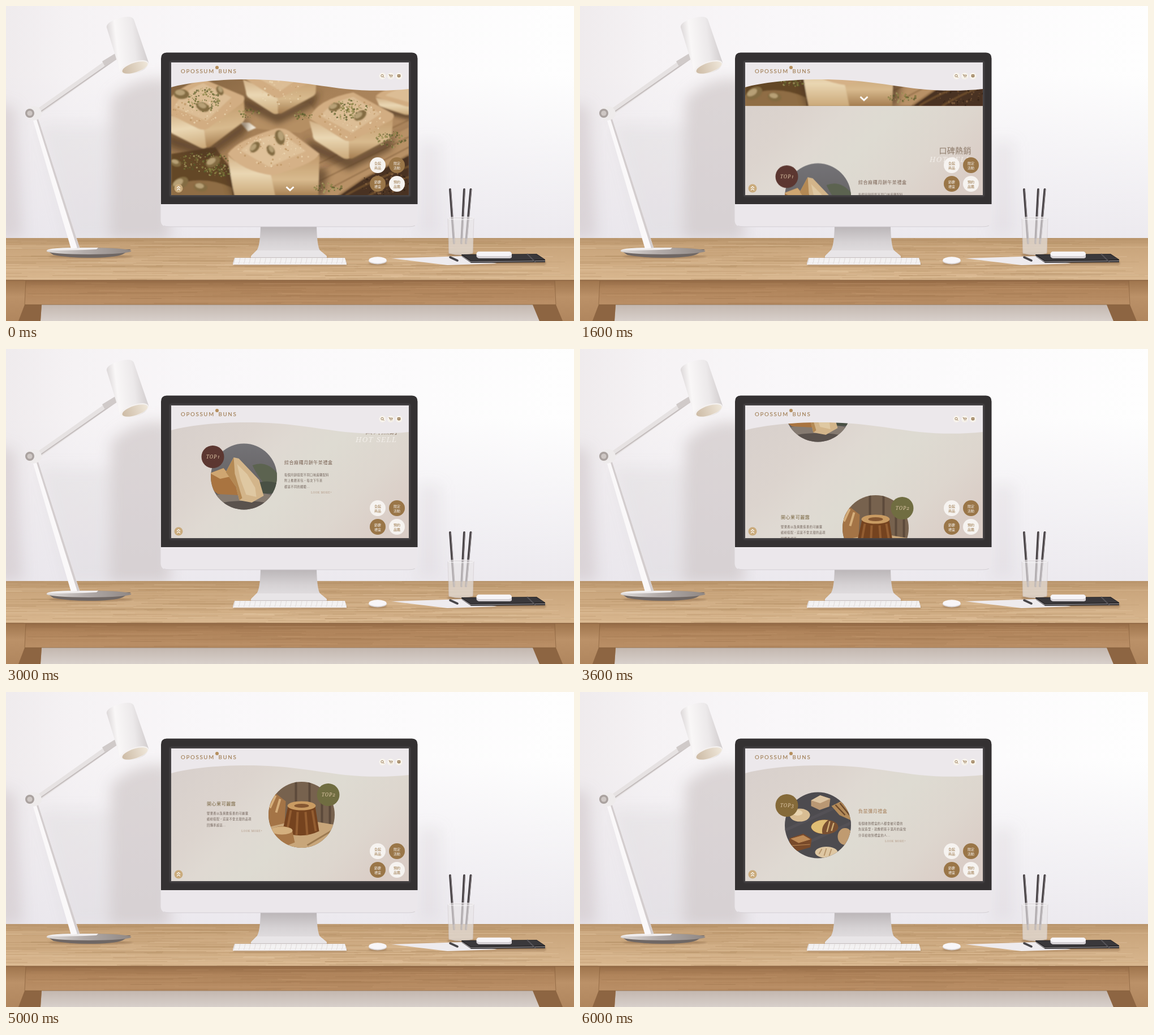
An HTML page for the animation above (7000 ms loop, 1004x558 px).

```html
<!DOCTYPE html>
<html>
<head>
<meta charset="utf-8">
<title>Cake shop on a desk</title>
<style>
html, body { margin: 0; width: 100%; height: 100%; overflow: hidden; background: #f7f5f8; }
svg { position: absolute; display: block; }
#room { left: 0; top: 0; }
#screen { left: 292px; top: 100px; overflow: hidden; }
text { font-family: "Noto Sans CJK TC", "Noto Sans CJK", sans-serif; }
.logo { font: 9.7px Lato, sans-serif; letter-spacing: 1.7px; fill: #a3825a; stroke: #a3825a; stroke-width: .2; }
.heading { font-size: 14px; letter-spacing: .3px; fill: #8b7867; }
.title { font-size: 8px; font-weight: 500; letter-spacing: .55px; }
.body { font-size: 5.2px; letter-spacing: .45px; fill: #6f6058; }
.btn { font-size: 6px; text-anchor: middle; }
.serif { font-family: "Noto Serif", serif; font-variant-numeric: oldstyle-nums; }
.sell { font-size: 13px; font-style: italic; letter-spacing: 1.4px; fill: #f6f2ee; opacity: .85; }
.top { font-size: 8.6px; font-style: italic; letter-spacing: .9px; text-anchor: middle; fill: #dcc4a4; }
.more { font-size: 5px; letter-spacing: .42px; fill: #b39a86; }
</style>
</head>
<body>
<svg id="room" width="1004" height="558" viewBox="0 0 1004 558">
  <defs>
    <linearGradient id="wall">
      <stop offset="0" stop-color="#efebed"/><stop offset=".12" stop-color="#f5f2f4"/>
      <stop offset=".35" stop-color="#f9f7f9"/><stop offset="1" stop-color="#fefefe"/>
    </linearGradient>
    <linearGradient id="wallLow" x2="0" y2="1">
      <stop offset=".3" stop-color="#e9e6ec" stop-opacity="0"/><stop offset="1" stop-color="#e9e6ec" stop-opacity=".85"/>
    </linearGradient>
    <linearGradient id="desk" x2="0" y2="1">
      <stop offset="0" stop-color="#b8946b"/><stop offset=".2" stop-color="#c9a57c"/><stop offset="1" stop-color="#d9b78f"/>
    </linearGradient>
    <linearGradient id="apron" x2="0" y2="1">
      <stop offset="0" stop-color="#946a45"/><stop offset=".35" stop-color="#b0845b"/><stop offset="1" stop-color="#ba8f66"/>
    </linearGradient>
    <linearGradient id="leg" x2="0" y2="1">
      <stop offset="0" stop-color="#9f754d"/><stop offset=".4" stop-color="#bb9168"/><stop offset="1" stop-color="#b0865e"/>
    </linearGradient>
    <linearGradient id="floor" x2="0" y2="1"><stop offset="0" stop-color="#c3b7af"/><stop offset="1" stop-color="#d8d0cb"/></linearGradient>
    <linearGradient id="neck" x2="0" y2="1">
      <stop offset="0" stop-color="#bab5b7"/><stop offset=".5" stop-color="#d6d2d4"/><stop offset="1" stop-color="#e6e3e5"/>
    </linearGradient>
    <linearGradient id="head" x1="0" y1=".55" x2="1" y2=".4">
      <stop offset="0" stop-color="#d5d0d1"/><stop offset=".25" stop-color="#f9f7f7"/>
      <stop offset=".65" stop-color="#ece9ea"/><stop offset="1" stop-color="#cdc8c9"/>
    </linearGradient>
    <linearGradient id="bulb"><stop offset="0" stop-color="#cdbba5"/><stop offset="1" stop-color="#efe7da"/></linearGradient>
    <linearGradient id="foot"><stop offset="0" stop-color="#dedad8"/><stop offset=".45" stop-color="#b3acaa"/><stop offset="1" stop-color="#8f8783"/></linearGradient>
    <filter id="soft" x="-50%" y="-50%" width="200%" height="200%"><feGaussianBlur stdDeviation="12"/></filter>
    <filter id="edge" x="-20%" y="-50%" width="140%" height="200%"><feGaussianBlur stdDeviation="1.6"/></filter>
  </defs>
  <rect width="1004" height="412" fill="url(#wall)"/>
  <rect width="1004" height="412" fill="url(#wallLow)"/>
  <g filter="url(#soft)" fill="#c9bfc0">
    <path d="M186 165Q230 120 290 130V415H184Z" opacity=".58"/>
    <path d="M60 210H190V415H110Z" opacity=".18"/>
    <path d="M-30 170L16 180L30 412H-30Z" opacity=".48"/>
    <path d="M728 240H768V405H728Z" opacity=".2"/>
  </g>

  <rect y="411" width="1004" height="76" fill="url(#desk)"/>
  <rect y="529" width="1004" height="29" fill="url(#floor)"/>
  <rect y="486" width="1004" height="43" fill="url(#apron)"/>
  <path d="M0 486H35L33 529H63L61 558H0ZM1004 486H970L972 529H931L943 558H1004Z" fill="url(#leg)"/>
  <path d="M33 529H63L61 558H22ZM972 529H931L943 558H984Z" fill="#8d6542"/>
  <g id="grain" stroke-width=".8"></g>
  <path d="M35 486L33 529H972L970 486" fill="none" stroke="#805a38" opacity=".6"/>
  <path d="M0 486H1004" stroke="#8b6340" stroke-width="1.4"/>

  <g filter="url(#edge)" fill="#805f40" opacity=".45">
    <ellipse cx="150" cy="444" rx="74" ry="3"/><ellipse cx="501" cy="446" rx="70" ry="3"/>
    <rect x="402" y="455" width="200" height="5"/><ellipse cx="657" cy="456" rx="16" ry="3"/>
    <ellipse cx="806" cy="441" rx="26" ry="4"/><path d="M815 452H954V458H790Z"/>
  </g>

  <path d="M72 433L84 441Q110 446 146 446Q190 446 206 440L221 431Z" fill="#6f6764"/>
  <ellipse cx="146.500" cy="434" rx="75" ry="6" fill="url(#foot)"/>
  <path d="M72 433Q74 429 110 428H163L160 431Q120 433 72 433Z" fill="#efecec"/>
  <path d="M48 203L57 200L130 428L115 430Z" fill="#faf8f9"/>
  <path d="M57 200L130 428L126 429L54 201Z" fill="#d3cdce"/>
  <path d="M57 181L192 85L198 93L62 190Z" fill="#e6e2e2"/>
  <path d="M60 188L197 92" stroke="#c3bcbc" stroke-width="2"/>
  <path d="M170 98L193 84L198 93L175 107Z" fill="#d0cac9"/>
  <ellipse cx="49" cy="190" rx="14" ry="12.5" fill="#eeebeb"/>
  <circle cx="42" cy="190" r="8" fill="#aaa29f"/><circle cx="42" cy="190" r="4.600" fill="#cec7c4"/>
  <path d="M178 38Q176 30 198 22Q222 15 226 24L252 100Q250 114 226 120Q206 124 202 117Z" fill="url(#head)"/>
  <ellipse cx="227" cy="108.500" rx="26" ry="10" fill="#f4f1f0" transform="rotate(-18 227 108.500)"/>
  <ellipse cx="228" cy="109" rx="23.500" ry="8.400" fill="url(#bulb)" transform="rotate(-18 228 109)"/>

  <path d="M450 390H549Q550 426 555 433L567 443V446H433V443L443 433Q449 426 450 390Z" fill="url(#neck)"/>
  <path d="M443 433L433 443V446H567V443L555 433Z" fill="#e8e5e7"/>
  <path d="M433 445.500H567" stroke="#c9c2c3"/>
  <path d="M273.500 350H727.500V379Q727.500 391 716 391H285Q273.500 391 273.500 379Z" fill="#ebe7eb"/>
  <path d="M279 389.500Q283 391 290 391H712Q719 391 723 389" fill="none" stroke="#d3ced3"/>
  <path d="M274 351V93Q274 82.500 284 82.500H717.500Q727.500 82.500 727.500 93V351Z" fill="#343132"/>
  <rect x="291" y="99" width="422" height="237" fill="none" stroke="#565256" stroke-width="2" filter="url(#edge)"/>

  <path d="M404 446H599L602 455V458H401V455Z" fill="#e0dbda"/>
  <g stroke="#faf9fa" stroke-width="1.9" stroke-dasharray="8 1.1">
    <path d="M405 447.600H599M404.500 450.200H600M404 452.800H600M403 455.400H601"/>
  </g>
  <path d="M401 457.500H602" stroke="#f6f4f5" stroke-width="1.400"/>
  <ellipse cx="657" cy="451.500" rx="16" ry="6" fill="#d9d4d5"/>
  <ellipse cx="657" cy="450" rx="15.600" ry="5.800" fill="#f8f6f8"/>

  <path d="M681 447L806 443L868 456L780 459Z" fill="#eeebee"/>
  <g fill="none" stroke="#484346" stroke-linecap="round">
    <path stroke-width="4" d="M785 325L792 420M810 325L805 420M821.500 325L813 420"/>
    <path stroke-width="1" stroke="#8b8487" d="M786.300 325L793 420M811.300 325L806.300 420M822.700 325L814.300 420"/>
  </g>
  <path d="M781 376Q804 372 827 376L825 438Q804 444 783 438Z" fill="#e9e5e7" opacity=".66" stroke="#cfc8ca"/>
  <path d="M783 412H826L825 438Q804 444 783 438Z" fill="#d9cdc0" opacity=".4"/>
  <ellipse cx="804" cy="376" rx="23" ry="2.500" fill="none" stroke="#f8f6f8"/>
  <path d="M785 445L798 451" stroke="#48464a" stroke-width="3.600" stroke-linecap="round"/>
  <path d="M805 440L938 439L953 449V454L822 455L806 444Z" fill="#2a282a"/>
  <path d="M807 441L937 440L952 449L822 451Z" fill="#3a383b"/>
  <path d="M806 443L821 453L953 451.500" fill="none" stroke="#a9a5a8" stroke-width="1.100"/>
  <path d="M921 439L936 454" stroke="#565458" stroke-width="2"/>
  <path d="M835 435H890Q894 436 894 440V445Q893 447 889 447H836Q832 446 831.500 443V439Q832 436 835 435Z" fill="#d5d1d5"/>
  <path d="M835 435H890Q894 436 894 440Q892 443 889 443H836Q832 442 831.500 439Q832 436 835 435Z" fill="#f6f4f7"/>
</svg>

<svg id="screen" width="420" height="235" viewBox="292 100 420 235">
  <defs>
    <linearGradient id="paper" x1="0" y1=".2" x2="1" y2=".75">
      <stop offset="0" stop-color="#d8d0cc"/><stop offset=".26" stop-color="#dcd4ce"/>
      <stop offset=".4" stop-color="#dfd9d2"/><stop offset=".56" stop-color="#dedbd2"/>
      <stop offset=".8" stop-color="#ddd6ce"/><stop offset="1" stop-color="#dacdc6"/>
    </linearGradient>
    <linearGradient id="board" x2="1" y2="1">
      <stop offset="0" stop-color="#7c5d3b"/><stop offset=".45" stop-color="#a78158"/>
      <stop offset=".7" stop-color="#b08960"/><stop offset="1" stop-color="#6b4c33"/>
    </linearGradient>
    <linearGradient id="side" x2="0" y2="1"><stop offset="0" stop-color="#d2b187"/><stop offset=".45" stop-color="#ead7b3"/><stop offset="1" stop-color="#cba97a"/></linearGradient>
    <linearGradient id="shade" x2="0" y2="1"><stop offset="0" stop-color="#c19a6c"/><stop offset=".6" stop-color="#d8ba8e"/><stop offset="1" stop-color="#a57e51"/></linearGradient>
    <linearGradient id="slate" x2="0" y2="1"><stop offset="0" stop-color="#747377"/><stop offset="1" stop-color="#5d5958"/></linearGradient>
    <filter id="photo" x="-10%" y="-10%" width="120%" height="120%"><feGaussianBlur stdDeviation="1.300"/></filter>
    <filter id="dim" x="-30%" y="-60%" width="160%" height="220%"><feGaussianBlur stdDeviation="6"/></filter>
    <clipPath id="heroBox"><rect x="292" y="100" width="420" height="236.500"/></clipPath>
    <clipPath id="disc"><circle r="58.500"/></clipPath>
    <g id="pic1">
      <rect x="-60" y="-60" width="120" height="120" fill="url(#slate)"/>
      <path d="M15 -20Q40 -30 60 -5V25Q35 22 15 -20Z" fill="#5c6350"/>
      <path d="M22 12Q40 5 60 12V30H25Z" fill="#495044"/>
      <ellipse cy="42" rx="62" ry="15" fill="#857a70"/><ellipse cy="52" rx="50" ry="9" fill="#5a524d"/>
      <path d="M-60 -6L-36 -15L-22 0L-8 33L-46 31L-60 20Z" fill="#a97440"/>
      <path d="M-60 -6L-36 -15L-24 0L-42 4Z" fill="#cfa671"/>
      <path d="M-32 -8L-18 -34L-9 -32L10 -12L27 6L35 34L14 46L-8 42L-14 18Z" fill="#d3b58a"/>
      <path d="M-32 -8L-18 -34L-16 -5L-3 38L-8 42L-14 18Z" fill="#b48954"/>
      <path d="M-12 -22L6 -4L20 20L22 36L4 32L-6 5Z" fill="#dfc8a2"/>
    </g>
    <g id="pic2">
      <rect x="-60" y="-60" width="120" height="120" fill="#77624e"/>
      <path d="M-10 -60V5M14 -60V0M36 -60V20M50 -60V25" stroke="#5c4a3b" stroke-width="4"/>
      <path d="M-60 20L0 8L60 18V60H-60Z" fill="#c8a67a"/>
      <path d="M10 54L60 24" stroke="#9c7a51" stroke-width="3"/>
      <path d="M-60 -15L-46 -38L-28 -24L-30 15L-60 22Z" fill="#a47446"/>
      <path d="M-56 -12L-46 -34M-45 -4L-38 -28" stroke="#d5ae7b" stroke-width="4"/>
      <path d="M-24 -15Q0 -28 24 -15L31 29Q0 44 -34 30Z" fill="#75431f"/>
      <path d="M-19 -8L-26 30M-7 -5L-9 36M7 -5L10 36M19 -8L25 29" stroke="#935d31" stroke-width="4"/>
      <ellipse cy="-16" rx="25" ry="8" fill="#c99b62"/><ellipse cy="-16" rx="13" ry="3.600" fill="#855732"/>
      <path d="M-60 30Q-38 13 -17 26L-12 49L-40 60H-60Z" fill="#a77748"/>
      <ellipse cx="-35" cy="28" rx="19" ry="7" fill="#d4b07e"/>
    </g>
    <g id="pic3">
      <rect x="-60" y="-60" width="120" height="120" fill="#4d4b4f"/>
      <path d="M-60 10L60 -45M-60 50L60 -5" stroke="#545156" stroke-width="5"/>
      <path d="M-12 -44L4 -53L22 -47L20 -33L3 -27L-12 -34Z" fill="#b99874"/><path d="M-12 -44L4 -53L22 -47L4 -39Z" fill="#dcc4a2"/>
      <path d="M24 -34L40 -42L60 -25V-8L38 -18Z" fill="#b38a59"/><path d="M31 -36L48 -18M39 -39L56 -18" stroke="#6d4a2c" stroke-width="2.500"/>
      <ellipse cx="-32" cy="-18" rx="18" ry="11.500" fill="#d9bd93"/><ellipse cx="-36" cy="-22" rx="9" ry="5" fill="#e9d4b0"/>
      <ellipse cx="12" cy="3" rx="24" ry="13" fill="#7a5031"/><path d="M-12 3A24 13 0 0 1 18 -9Q5 1 8 15A24 13 0 0 1 -12 3Z" fill="#dfbd74"/>
      <path d="M16 12L21 -7M24 10L28 -4" stroke="#ceac74" stroke-width="2.500"/>
      <ellipse cx="48" cy="20" rx="13" ry="15" fill="#c09b70"/>
      <path d="M-50 23L-26 15L-11 24L-13 39L-37 46L-51 36Z" fill="#794a2a"/><path d="M-47 24L-26 18L-14 25L-34 31ZM-46 36L-14 34" fill="#bd8b58" stroke="#bd8b58"/>
      <ellipse cx="15" cy="48" rx="20" ry="10" fill="#dec7a3"/><path d="M2 51L7 42M11 54L15 41M20 54L24 42" stroke="#b7966c" stroke-width="2"/>
    </g>
    <g id="cake">
      <path d="M-80 30L0 62L80 22L70 50L-4 86L-72 54Z" fill="#4f3720" opacity=".7" filter="url(#dim)"/>
      <path d="M-74 -2Q-40 10 -4 32L-2 64Q-8 68 -16 63L-62 34Q-68 30 -68 22Z" fill="url(#side)"/>
      <path d="M-4 32L74 -8L72 24Q70 30 62 33L4 64Q-2 67 -4 62Z" fill="url(#shade)"/>
      <path d="M-74 -6Q-60 -40 4 -52L74 -14Q78 -8 70 -2L4 33Q-5 37 -15 31Z" fill="#d2ad82"/>
      <path d="M-54 -10Q-35 -36 4 -44L52 -14L2 20Z" fill="#dcbd95"/>
    </g>
    <g id="nut"><ellipse rx="11" ry="7" fill="#836c42"/><ellipse cx="-2" cy="-2" rx="7" ry="4" fill="#b7a076"/></g>
  </defs>
  <rect x="292" y="100" width="420" height="236" fill="url(#paper)"/>

  <g id="page">
    <g clip-path="url(#heroBox)">
      <rect x="292" y="100" width="420" height="237" fill="url(#board)"/>
      <g filter="url(#photo)">
        <path d="M420 190L535 172L560 205L520 225L420 215Z" fill="#b58f64"/>
        <path d="M545 300L712 215V262L590 336H530Z" fill="#b89166"/>
        <path d="M540 285L712 202M550 312L712 232M575 322L712 250" stroke="#94704a" stroke-width="2" fill="none"/>
        <path d="M585 337L630 306L712 262V337Z" fill="#4a3221"/>
        <path d="M588 335L630 306L712 263" stroke="#a17c52" stroke-width="3" fill="none"/>
        <path d="M600 336Q640 312 712 284M640 337Q680 312 712 303" stroke="#70502f" stroke-width="3" fill="none"/>
        <path d="M292 262L370 250L405 300V337H292Z" fill="#644728"/>
        <path d="M292 318Q350 298 400 322V337H292Z" fill="#8f6d44"/>
        <path d="M414 206L430 207L442 216L428 222Z" fill="#f1e8d6"/>
        <use href="#cake" transform="translate(484 132) scale(.88 .9)"/>
        <use href="#cake" transform="translate(350 183) scale(.97 1.040) rotate(-7)"/>
        <use href="#cake" transform="translate(716 163) scale(.85 .45)"/>
        <use href="#cake" transform="translate(610 205)"/>
        <path d="M385 280L400 337H560L570 290Z" fill="#4f3720" opacity=".65" filter="url(#dim)"/>
        <path d="M392 264Q410 285 470 298L478 337H404Q396 300 392 264Z" fill="url(#side)"/>
        <path d="M468 298Q530 285 554 264L552 337H476Z" fill="url(#shade)"/>
        <path d="M392 262Q410 236 478 217Q492 215 504 224L554 262Q545 280 470 300Q416 292 392 262Z" fill="#d5b187"/>
        <path d="M415 256Q440 232 487 226L530 257L465 285Z" fill="#dfc199"/>
      </g>
      <g id="crumbs"></g>
      <g id="nuts" filter="url(#photo)"></g>
      <path d="M495.500 320.500L502 326.500L508.500 320.500" fill="none" stroke="#fff" stroke-width="3"/>
    </g>
    <text class="heading" x="634.500" y="421">口碑熱銷</text>
    <text class="serif sell" x="618" y="435.500">HOT SELL</text>
    <g id="items"></g>
  </g>

  <path d="M292 100H712V147C680 150.500 640 151 600 147C540 140 500 130 425 130C370 130 320 136 292 144Z" fill="#ece8eb"/>
  <text class="logo" x="309" y="118.500">OPOSSUM</text>
  <text class="logo" x="375.500" y="118.500">BUNS</text>
  <circle cx="373" cy="109" r="3" fill="#b58e5c"/>
  <g fill="#f7f3ec"><circle cx="665.500" cy="124" r="6"/><circle cx="680" cy="124" r="6"/><circle cx="694.500" cy="124" r="6"/></g>
  <g fill="none" stroke="#94744c" stroke-width=".9">
    <circle cx="665" cy="123.500" r="2.100"/><path d="M666.600 125.100L668.400 126.900M676.700 121.600H678L679 125H682.300L683.200 122.400H678.300"/>
    <path d="M679.300 126.900H679.900M681.800 126.900H682.400"/>
    <path d="M692.200 121.800H696.800V125.600H695.500L694.500 126.600L693.500 125.600H692.200Z" fill="#94744c"/>
    <path d="M693 123.700H696" stroke="#f7f3ec"/>
  </g>
  <g id="buttons"></g>
  <circle cx="305" cy="323" r="7.500" fill="#caab7c"/>
  <path d="M302 322.500L305 319.800L308 322.500M302 326.300L305 323.600L308 326.300" fill="none" stroke="#fff" stroke-width="1.100"/>
</svg>

<script>
const NS = "http://www.w3.org/2000/svg";
const $ = id => document.getElementById(id);
const add = (parent, tag, attrs, text = "") => {
  const node = document.createElementNS(NS, tag);
  for (const key in attrs) node.setAttribute(key, attrs[key]);
  node.textContent = text;
  return parent.appendChild(node);
};

let seed = 7;
const rand = () => (seed = (seed * 16807) % 2147483647) / 2147483647;
const pick = list => list[Math.floor(rand() * list.length)];

// Wood grain on the desk top and its front board
for (let i = 0; i < 420; i++) {
  const front = i > 330;
  const x = (front ? 36 : -60) + rand() * 900;
  const y = front ? 489 + rand() * 38 : 412 + rand() * 73;
  const end = Math.min(x + 40 + rand() * 200, front ? 968 : 1004);
  add($("grain"), "path", {
    d: `M${x} ${y}H${end}`,
    stroke: pick(front ? ["#936a45", "#c79d74"] : ["#a07a50", "#ad885c", "#ebd2b0"]),
    opacity: 0.15 + rand() * 0.3
  });
}

const greens = ["#6f6e34", "#8a8345", "#55592b", "#a79d62"];
const sugar = ["#ecd8b4", "#bd9564", "#e5cba2"];
const bark = ["#2f1e13", "#6f4e31", "#8b6643"];
const clusters = [
  [350, 166, 28, 22, 130, greens], [606, 184, 34, 18, 120, greens],
  [348, 276, 46, 18, 130, greens], [376, 293, 24, 9, 60, greens],
  [430, 189, 20, 9, 35, greens], [525, 193, 17, 9, 35, greens],
  [680, 236, 26, 15, 80, greens], [570, 322, 25, 9, 45, greens],
  [350, 185, 55, 25, 60, sugar], [611, 200, 58, 33, 80, sugar],
  [474, 257, 65, 30, 90, sugar], [485, 152, 45, 22, 35, sugar],
  [672, 315, 45, 22, 90, bark]
];
for (const [cx, cy, rx, ry, count, colors] of clusters) {
  for (let i = 0; i < count; i++) {
    const a = rand() * Math.PI * 2, d = Math.sqrt(rand());
    add($("crumbs"), "circle", {
      cx: cx + Math.cos(a) * d * rx, cy: cy + Math.sin(a) * d * ry,
      r: 0.5 + rand() * 1.6, fill: pick(colors), opacity: 0.7
    });
  }
}

const nuts = [
  [310, 156, 1.25, 5], [348, 179, 1.1, 22], [378, 150, 0.8, 60], [581, 179, 1, -20],
  [626, 194, 1.1, -35], [484, 233, 1.2, 75], [440, 250, 1, -50], [468, 256, 0.9, 60],
  [366, 276, 1.25, -30], [308, 314, 1.4, -30], [300, 278, 0.9, 20], [344, 321, 1.1, 10]
];
for (const [x, y, s, a] of nuts)
  add($("nuts"), "use", { href: "#nut", transform: `translate(${x} ${y}) rotate(${a}) scale(${s})` });

const items = [
  { x: 420.5, y: 497, badge: [365.5, 462], fill: "#5c3731", tx: 492, ty: 472, gap: 22, more: 47,
    ink: "#775f50", title: "綜合麻糬月餅午茶禮盒",
    lines: ["每個月餅搭配不同口味麻糬配料", "附上推薦茶包，每次下午茶", "都是不同的體驗..."] },
  { x: 522.5, y: 708.5, badge: [569.5, 673], fill: "#706d41", tx: 355, ty: 689, gap: 17, more: 61,
    ink: "#796640", title: "開心果可麗露",
    lines: ["堅果香以及爽脆焦香的可麗露", "繽紛搭配，這是不會太甜的品項", "回購率超高..."] },
  { x: 420.5, y: 927, badge: [365.5, 892], fill: "#856a39", tx: 492, ty: 902, gap: 22, more: 47,
    ink: "#a67e58", title: "負鼠彌月禮盒",
    lines: ["每個收到禮盒的人都會被可愛的", "負鼠造型，就像把孩子滿月的喜悅", "分享給收到禮盒的人..."] }
];
items.forEach((it, i) => {
  const g = add($("items"), "g", {});
  const disc = add(g, "g", { transform: `translate(${it.x} ${it.y})` });
  add(disc, "use", { href: `#pic${i + 1}`, "clip-path": "url(#disc)" });
  const [bx, by] = it.badge;
  add(g, "circle", { cx: bx, cy: by, r: 20, fill: it.fill });
  add(g, "text", { class: "serif top", x: bx + 1, y: by + 3 }, `TOP${i + 1}`);
  add(g, "text", { class: "title", x: it.tx, y: it.ty + 3, fill: it.ink }, it.title);
  it.lines.forEach((line, n) =>
    add(g, "text", { class: "body", x: it.tx, y: it.ty + it.gap + 2 + n * 10.3 }, line));
  add(g, "text", { class: "serif more", x: it.tx + it.more, y: it.ty + it.gap + 32.8 }, "LOOK MORE+");
});

const white = "#f6f3f0", brown = "#9a7648";
const buttons = [
  [657, 282, white, brown, "全館", "商品"], [691, 282, brown, white, "限定", "活動"],
  [657, 315, brown, white, "節慶", "禮盒"], [691, 315, white, brown, "預約", "品鑑"]
];
for (const [x, y, fill, ink, a, b] of buttons) {
  add($("buttons"), "circle", { cx: x, cy: y, r: 14, fill });
  add($("buttons"), "text", { class: "btn", x, y: y - 1.2, fill: ink }, a);
  add($("buttons"), "text", { class: "btn", x, y: y + 6.8, fill: ink }, b);
}

// Page scroll: rest, then eleven hard steps of 100 ms to the next stop
const LOOP = 7000;
const stops = [[0, 0], [900, 0], [2000, 251], [2900, 251], [4000, 471], [4900, 471], [6000, 691], [LOOP, 691]];
$("page").animate(
  stops.map(([time, y]) => ({
    offset: time / LOOP, transform: `translateY(${-y}px)`, easing: "steps(11, end)"
  })),
  { duration: LOOP, iterations: Infinity, delay: -1 }
);
</script>
</body>
</html>
```
